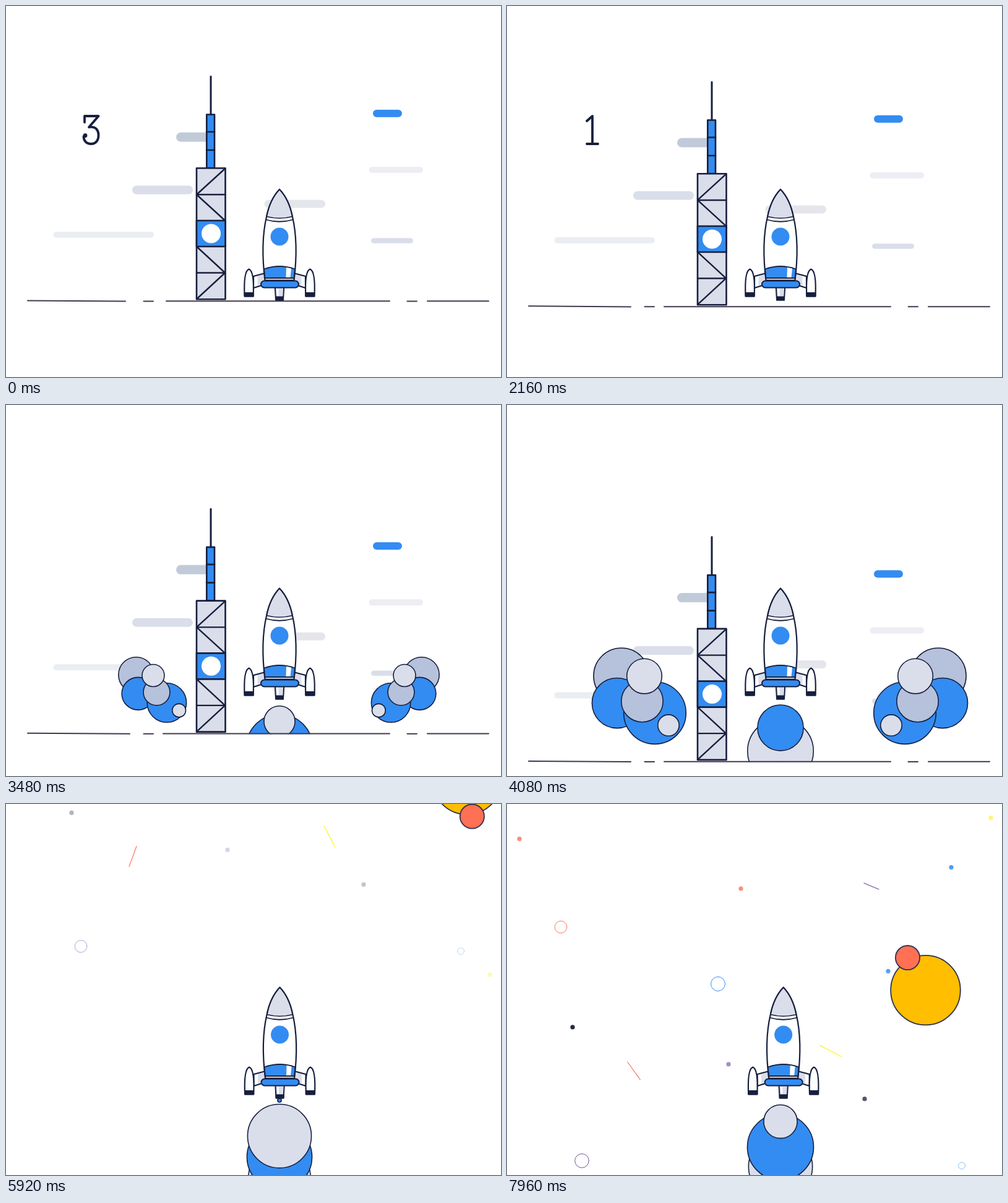
Animation of 800 by 600 pixels, one loop 8000 ms. Source, as an HTML page with a canvas:

```html
<!DOCTYPE html>
<html lang="en">
<head>
<meta charset="utf-8">
<title>Rocket launch</title>
<style>
  html, body { margin: 0; width: 100%; height: 100%; overflow: hidden; background: #fff; }
  canvas { display: block; width: 100vw; height: 100vh; }
</style>
</head>
<body>
<canvas id="stage" width="800" height="600"></canvas>
<script>
const ctx = document.getElementById('stage').getContext('2d');
const LOOP = 8000, MID = 442;
const NAVY = '#171f3e', BLUE = '#338cf1', LIGHT = '#dadeea', STEEL = '#b6c1db';
const RED = '#ff7055', YELLOW = '#fff21f', PURPLE = '#7048a0';

// Smooth curve through [time, value] keys, carried on straight past the last key.
function track(t, keys) {
  const n = keys.length - 1;
  if (t <= keys[0][0]) return keys[0][1];
  const slope = (i, j) => (keys[j][1] - keys[i][1]) / (keys[j][0] - keys[i][0]);
  if (t >= keys[n][0]) return keys[n][1] + slope(n - 1, n) * (t - keys[n][0]);
  let i = 0;
  while (t > keys[i + 1][0]) i++;
  const [t0, a] = keys[i], [t1, b] = keys[i + 1], h = t1 - t0, u = (t - t0) / h;
  const m0 = i ? slope(i - 1, i + 1) : slope(0, 1);
  const m1 = i + 1 < n ? slope(i, i + 2) : slope(n - 1, n);
  const u2 = u * u, u3 = u2 * u;
  return (2 * u3 - 3 * u2 + 1) * a + (u3 - 2 * u2 + u) * h * m0
    + (3 * u2 - 2 * u3) * b + (u3 - u2) * h * m1;
}

function linear(t, keys) {
  let i = 0;
  while (i < keys.length - 2 && t > keys[i + 1][0]) i++;
  const [t0, a] = keys[i], [t1, b] = keys[i + 1];
  return a + (b - a) * (t - t0) / (t1 - t0);
}

function paint(path, fill, stroke, width) {
  if (fill) { ctx.fillStyle = fill; ctx.fill(path); }
  if (stroke) { ctx.strokeStyle = stroke; ctx.lineWidth = width; ctx.stroke(path); }
}
function shape(d, fill, stroke = NAVY, width = 2.2) { paint(new Path2D(d), fill, stroke, width); }
function disc(x, y, r, fill, stroke, width) {
  if (r <= 0) return;
  const p = new Path2D();
  p.arc(x, y, r, 0, 7);
  paint(p, fill, stroke, width);
}
function pill(x0, x1, y, h, fill, stroke, width) {
  const p = new Path2D();
  p.roundRect(x0, y - h / 2, x1 - x0, h, h / 2);
  paint(p, fill, stroke, width);
}
function shifted(x, y, draw) {
  ctx.save();
  ctx.translate(x, y);
  draw();
  ctx.restore();
}

// Downward travel of the launch site.
const DROP = [[0, 0], [1360, .8], [1680, 2], [2520, 15.5], [2840, 25.5], [3360, 47.3],
  [4080, 99.5], [5000, 231.5], [5920, 495]];

// Sky: kind, colour, x, y and opacity at 5920 ms, opacity at 7960 ms, radius or angles
const SKY_START = 4720, SKY_SPEED = .17;
const STARS = [
  ['ring', PURPLE, 121, 230, .5, .95, 9.8, 11.3],
  ['ring', BLUE, 735, 238, .35, .55, 5.5, 5.5],
  ['dot', YELLOW, 782, 276, .35, -.6],
  ['dot', NAVY, 106, 14, .33, .95],
  ['dot', PURPLE, 358, 74, .25, .62],
  ['dot', NAVY, 578, 130, .26, .75],
  ['line', RED, 205, 84.5, 1, 1, 110, 54.5, 17.5],
  ['line', YELLOW, 523, 52.5, 1, 1, 62.8, 27.9, 19.4],
  ['dot', RED, 20, -290.5, .5, .8],
  ['dot', RED, 378, -210, .5, .8],
  ['dot', BLUE, 718, -244.5, .5, .85],
  ['dot', BLUE, 616, -76.5, .4, .82],
  ['ring', RED, 87, -148, .6, .95, 9.8, 9.8],
  ['ring', BLUE, 341, -56, .6, 1, 11.5, 11.5],
  ['line', PURPLE, 589, -214, 1, 1, 57, 22.6, 13],
  ['dot', YELLOW, 782, -324.5, .4, .65],
];

function drawSky(t) {
  if (t < SKY_START) return;
  const k = (t - 5920) / 2040, mix = (a, b) => a + (b - a) * k;
  for (const [kind, color, x, y0, o0, o1, a, b, half] of STARS) {
    const y = y0 + SKY_SPEED * (t - 5920);
    if (y < -30 || y > 630) continue;
    ctx.globalAlpha = Math.min(1, Math.max(.2, mix(o0, o1)));
    if (kind === 'dot') disc(x, y, 3.6, color);
    else if (kind === 'ring') disc(x, y, Math.max(a, mix(a, b)), null, color, 1);
    else {
      const ang = mix(a, b) * Math.PI / 180, dx = half * Math.cos(ang), dy = half * Math.sin(ang);
      shape(`M${x - dx} ${y - dy}L${x + dx} ${y + dy}`, null, color, 1.2);
    }
  }
  ctx.globalAlpha = 1;
}

function drawPlanet(t) {
  if (t < 5700) return;
  const x = track(t, [[5700, 758], [5920, 745], [6160, 732.5], [7960, 676.5]]);
  const y = -39.5 + .1669 * (t - 5920);
  const ang = (81.9 + .078 * (t - 5920)) * Math.PI / 180;
  disc(x, y, 56.3, '#ffbe00', '#2c3150', 1.8);
  disc(x + 60 * Math.cos(ang), y + 60 * Math.sin(ang), 19.6, RED, '#2c3150', 1.8);
}

// Exhaust: puffs of alternating colour; age is counted in puffs.
const PUFFS = [[2840, .17], [4080, 2.71], [5000, 4.33], [5920, 6.06], [7960, 9.52]];
const PUFF_R = [[0, 0], [.17, 8.5], [.33, 17], [.52, 27], [.71, 37], [1.06, 51.5],
  [1.3, 53.5], [2.06, 52.6], [3.06, 50.5]];
const PUFF_Y = [[0, 477], [.06, 479], [.17, 492], [.33, 504], [.52, 513.5], [.71, 522],
  [1.06, 537], [1.33, 549], [1.71, 560], [2.06, 571], [3.06, 605]];

function drawExhaust(t, drop) {
  const n = linear(t, PUFFS), newest = Math.floor(n);
  ctx.save();
  ctx.beginPath();
  ctx.rect(0, 0, 800, 478 + drop);
  ctx.clip();
  for (let k = Math.max(-1, newest - 3); k <= newest; k++) {
    const age = n - k;
    disc(MID, track(age, PUFF_Y), track(age, PUFF_R), k % 2 ? LIGHT : BLUE, NAVY, 1.6);
  }
  ctx.restore();
}

// Billows beside the pad: colour, then x, height on the site and radius at three times
const BILLOW_T = [2840, 4080, 5000];
const BILLOWS = [
  [STEEL, [250.5, 185, 177], [433.5, 338.5, 297.5], [12, 45, 76]],
  [BLUE, [262, 178, 162], [446.5, 382.5, 347.5], [12, 40.5, 68.3]],
  [BLUE, [288, 239, 235], [458.5, 398.5, 369.5], [13, 50.3, 85.3]],
  [STEEL, [276.5, 218.5, 201], [446.5, 379.5, 354.5], [9, 33.7, 57]],
  [LIGHT, [265, 222, 219.5], [435.5, 339, 300.5], [7.5, 28.3, 47.5]],
  [LIGHT, [302.5, 261, 258], [462.5, 418.5, 397], [4.5, 17.2, 29]],
];

function drawBillows(t, drop) {
  if (t < 2400 || t > 6200) return;
  const at = (start, v) => track(t, [[2400, start], ...BILLOW_T.map((time, i) => [time, v[i]])]);
  for (const [color, xs, ys, rs] of BILLOWS) {
    const x = at(310, xs), y = at(470, ys) + drop, r = at(0, rs);
    disc(x, y, r, color, NAVY, 1.6);
    disc(882 - x, y, r, color, NAVY, 1.6);
  }
}

const CLOUDS = [
  ['#c1cad9', 275, 335, 212, 15], ['#dadeea', 204, 302, 297.5, 14],
  ['#eaeef2', 76.5, 239, 370, 10], ['#e5e6eb', 417.5, 516, 320, 13],
  [BLUE, 593, 640, 173.7, 12], ['#eceef3', 586.5, 674, 265, 10],
  ['#dadeea', 590, 658, 379.5, 8.5],
];

function drawSite(t) {
  for (const [color, x0, x1, y, h] of CLOUDS) pill(x0, x1, y, h, color);

  const grow = Math.min(1, t / 1000), ground = '#42394f';
  ctx.lineCap = 'round';
  shape(`M35 476.4L${193 + 7 * grow} 477.5`, null, ground, 2);
  shape(`M222.5 477.4H238M${259 - 5 * grow} 477.2H620M648.5 477.4H664M681 477.2H780`, null, ground, 2);

  shape('M331 114V175', null, NAVY, 3);
  shape('M324.3 175.5H337V262H324.3Z', BLUE, NAVY, 2.6);
  shape('M324 203.5H337M324 233H337', null, NAVY, 2.6);
  shape('M308 262.3H354.5V474.3H308Z', LIGHT, NAVY, 2.6);
  shape('M308 347H354.5V389H308Z', BLUE, NAVY, 2.6);
  shape('M354 263L308 305H354M308 305L354 347M308 389L354 431.5H308M354 431.5L308 474',
    null, NAVY, 2.4);
  disc(331.5, 368, 15.5, '#fff');
}

function drawFin() {
  shape('M400 437L419 432V450L400 456Z', LIGHT, NAVY, 2);
  shape('M401.5 438.5L406.5 437V452.5L401.5 454Z', '#fff', null);
  shape('M385.6 469.5C384.6 449 385.5 428 392.6 425.6C399.6 428 400.6 449 399.6 469.5Z', '#fff');
  shape('M385.7 464H399.6V469.5H385.7Z', NAVY);
}

function drawRocket() {
  ctx.lineJoin = 'round';
  shape('M434.8 455L436 475.5H448L449.2 455Z', LIGHT, NAVY, 2);
  shape('M437.5 457H440.5V469H438.5Z', '#fff', null);
  shape('M436 470.5H448V475.5H436Z', NAVY, NAVY, 2);
  drawFin();
  ctx.save();
  ctx.translate(2 * MID, 0);
  ctx.scale(-1, 1);
  drawFin();
  ctx.restore();

  const hull = 'M442 296.5C431 308 424.5 323 421 341C414 371 413.5 403 418.5 443.5'
    + 'H465.5C470.5 403 470 371 463 341C459.5 323 453 308 442 296.5Z';
  shape(hull, '#fff', null);
  shape('M442 296.5C431 308 424.5 323 421 340.5Q442 346 463 340.5C459.5 323 453 308 442 296.5Z',
    LIGHT, NAVY, 1.6);
  shape('M420 345.5Q442 352 464 345.5', null, NAVY, 1.8);
  shape('M417 425.5Q442 416.5 467 425.5L465.8 440H418.2Z', BLUE, NAVY, 1.8);
  shape('M453 422.8L461 424.5L459.5 439H452.5Z', '#fff', null);
  shape('M418.5 440.3H465.5', null, NAVY, 1.6);
  shape(hull, null);
  disc(MID, 373, 14.5, BLUE);
  pill(412, 473, 450, 10.8, BLUE, NAVY, 2);
}

// Countdown numerals: strokes and ball ends
const DIGITS = [
  [900, 'M127 188V178H149.5L134 196C146 194 149.5 202 149.5 209C149.5 218 144.5 223 137.5 223'
    + 'C130 223 125.5 218 125.5 211', [[128, 209.5]]],
  [1800, 'M126 189C126 181 131 177 138 177C145 177 149.5 182 149.5 188.5C149.5 201 126 204 125 222'
    + 'C127 214 134 213 138 218.5C142 224.5 150 224.5 150 213', [[127.7, 190.5], [148.3, 211.5]]],
  [2600, 'M129 186L138 178V223M129 223H147', []],
];

function drawCount(t) {
  const digit = DIGITS.find(d => t < d[0]);
  if (!digit) return;
  ctx.lineCap = ctx.lineJoin = 'round';
  shape(digit[1], null, NAVY, 3.8);
  for (const [x, y] of digit[2]) disc(x, y, 3.4, NAVY);
}

function sway(t) {
  return t < 4050 ? 0 : 4.75 * (1 - Math.cos(2 * Math.PI * (t - 4050) / 1740));
}

function render(t) {
  ctx.fillStyle = '#fff';
  ctx.fillRect(0, 0, 800, 600);
  const drop = track(t, DROP);
  drawSky(t);
  drawPlanet(t);
  drawExhaust(t, drop);
  if (drop < 520) shifted(0, drop, () => drawSite(t));
  shifted(sway(t), 0, drawRocket);
  drawBillows(t, drop);
  drawCount(t);
}

const start = performance.now();
function tick() {
  render((performance.now() - start) % LOOP);
  requestAnimationFrame(tick);
}
tick();
</script>
</body>
</html>
```
